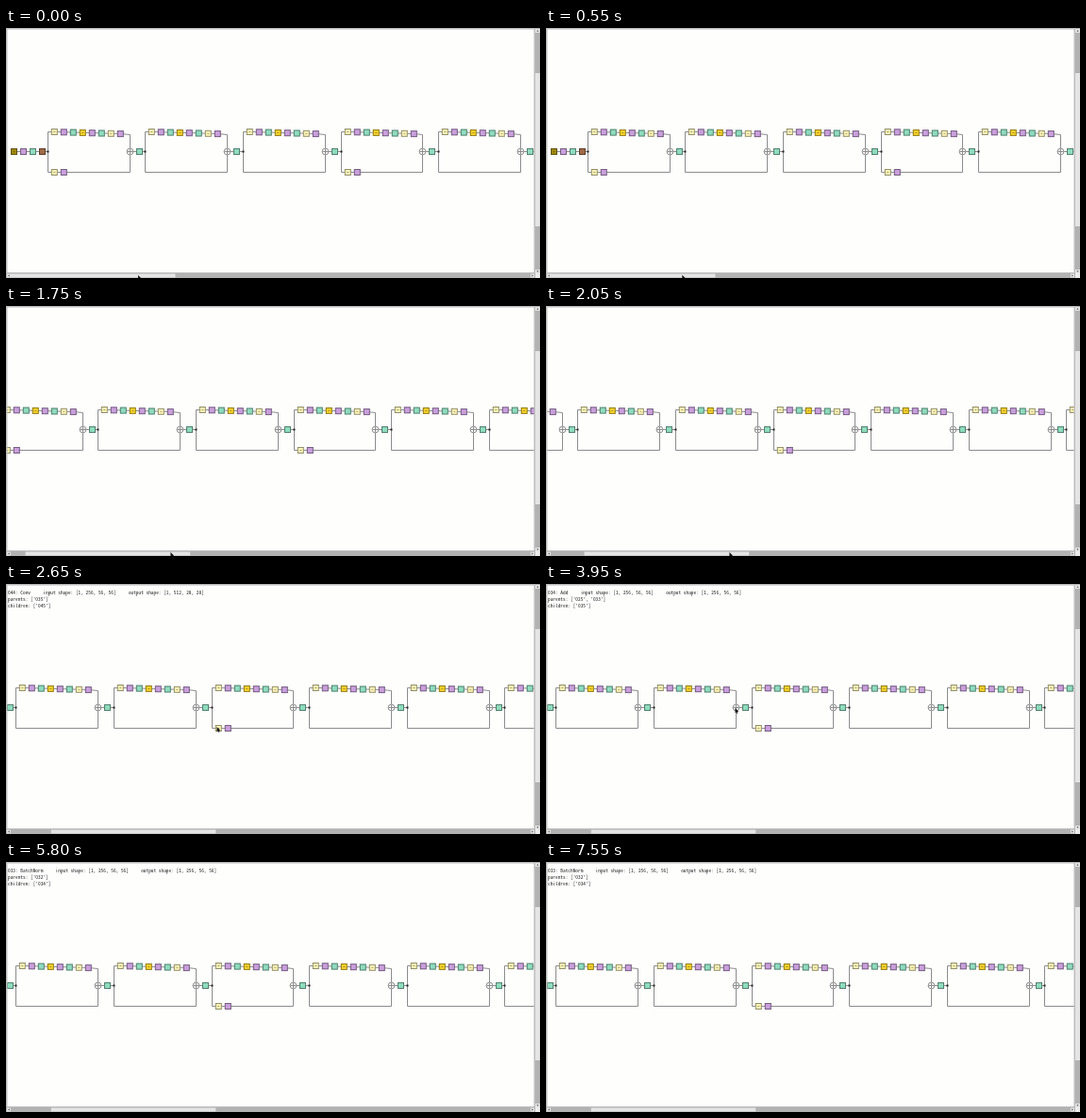
An HTML page with a canvas that plays this animation: 566x266 px, repeating every 7650 ms.

```html
<!DOCTYPE html>
<html lang="en">
<head>
<meta charset="utf-8">
<title>Network graph viewer</title>
<style>
  html, body { margin: 0; width: 100%; height: 100%; overflow: hidden; background: #fefefd; }
  canvas { display: block; width: 566px; height: 266px; }
</style>
</head>
<body>
<canvas id="stage" width="566" height="266"></canvas>
<script>
const ctx = document.getElementById('stage').getContext('2d');
const LOOP = 7650, STEP = 50;
const COLORS = {
  conv7: '#a08a0a', conv3: '#f6d32c', conv1: '#fbf4b8',
  norm: '#c9a0dc', relu: '#8fdcbf', pool: '#a06c48'
};
const MAIN = ['conv1', 'norm', 'relu', 'conv3', 'norm', 'relu', 'conv1', 'norm'];
const STEM = ['conv7', 'norm', 'relu', 'pool'];
const PAPER = '#fefefd', WIRE = '#8c8c8c', TRACK = '#b2b2b2', THUMB = '#e4e4e4';
const MID = 131.5, TOP = 110.5, BOTTOM = 153.5;
const SCROLL_RATIO = 3.2, GRAB_X = 158.8, DRAG_START = 1100, DRAG_END = 2150;

// [time, value...]
const SCROLL = [[1350, 0], [1500, 13.5], [1750, 50], [2050, 114], [DRAG_END, 137]];
const POINTER = [
  [300, 140, 263], [DRAG_START, GRAB_X, 262], [DRAG_END, 201.6, 262], [2650, 223.5, 152],
  [3050, 223.5, 152], [3450, 211.5, 133], [3700, 211.5, 133], [3950, 200.5, 132],
  [4250, 200.5, 132], [4750, 190.5, 112], [5150, 190.5, 112], [5800, 188, -8]
];

const SMALL = '[1, 256, 56, 56]';
const info = (time, id, type, output, parents, children) =>
  ({ time, lines: [
    `${id}: ${type}     input shape: ${SMALL}     output shape: ${output}`,
    `parents: [${parents}]`, `children: [${children}]`
  ] });
const INFO = [
  info(2600, '044', 'Conv', '[1, 512, 28, 28]', "'035'", "'045'"),
  info(3350, '035', 'ReLU', SMALL, "'034'", "'036', '044'"),
  info(3850, '034', 'Add', SMALL, "'025', '033'", "'035'"),
  info(4600, '033', 'BatchNorm', SMALL, "'032'", "'034'")
];

const FONT = '5.34px "Noto Sans Mono CJK SC", "Noto Sans Mono CJK JP", "Liberation Mono", monospace';

const linear = u => u;
const smooth = u => u * u * (3 - 2 * u);
const snap = v => Math.round(v) + 0.5;

function sample(keys, t, ease) {
  if (t <= keys[0][0]) return keys[0].slice(1);
  for (let i = 1; i < keys.length; i++) {
    const [a, b] = [keys[i - 1], keys[i]];
    if (t > b[0]) continue;
    const u = ease((t - a[0]) / (b[0] - a[0]));
    return b.slice(1).map((v, k) => a[k + 1] + (v - a[k + 1]) * u);
  }
  return keys[keys.length - 1].slice(1);
}

function rect(x, y, w, h, color) {
  ctx.fillStyle = color;
  ctx.fillRect(x, y, w, h);
}

function path(...points) {
  ctx.beginPath();
  points.forEach(([x, y]) => ctx.lineTo(x, y));
  ctx.strokeStyle = WIRE;
  ctx.stroke();
}

function node(type, x, y) {
  rect(x - 3.5, y - 3.5, 7, 7, COLORS[type]);
  ctx.strokeStyle = 'rgba(0, 0, 0, 0.42)';
  ctx.strokeRect(x - 3, y - 3, 6, 6);
  if (type.startsWith('conv')) rect(x - 1, y - 0.5, 2, 1, 'rgba(80, 60, 20, 0.45)');
}

function adder(x) {
  ctx.beginPath();
  ctx.arc(x, MID, 3.4, 0, Math.PI * 2);
  ctx.fillStyle = PAPER;
  ctx.fill();
  ctx.strokeStyle = WIRE;
  ctx.stroke();
  path([x - 3, MID], [x + 3, MID]);
  path([x, MID - 3], [x, MID + 3]);
}

function block(start, hasBranch) {
  const x = snap(start), add = snap(start + 86.9);
  path([x, MID], [x, TOP], [x + 10, TOP], [x + 77, TOP + 2], [add, TOP + 3],
       [add, BOTTOM], [x, BOTTOM], [x, MID]);
  path([add, MID], [snap(start + 103.57), MID]);
  MAIN.forEach((type, k) => node(type, x + 6.8 + 10 * k, TOP + 0.3 * k));
  if (hasBranch) ['conv1', 'norm'].forEach((type, k) => node(type, x + 6.8 + 10 * k, BOTTOM));
  adder(add);
  node('relu', add + 10, MID);
  rect(x - 1, MID - 1, 2, 2, '#222');
}

function network(scroll) {
  const stem = snap(7.8 - scroll);
  path([stem, MID], [stem + 36, MID]);
  STEM.forEach((type, k) => node(type, stem + 10 * k, MID));
  for (let i = 0; i < 7; i++)
    block(43.8 + 103.57 * i - scroll, i === 0 || i === 3);
}

function arrow(x, y, dx, dy) {
  ctx.beginPath();
  ctx.moveTo(x + dx * 1.3, y + dy * 1.3);
  ctx.lineTo(x - dx + dy, y - dy + dx);
  ctx.lineTo(x - dx - dy, y - dy - dx);
  ctx.fillStyle = '#777';
  ctx.fill();
}

function windowFrame(scroll) {
  ctx.strokeStyle = '#bebebe';
  ctx.lineWidth = 1.5;
  ctx.strokeRect(0.75, 0.75, 559.5, 260);
  rect(561, 0, 5, 261, TRACK);
  rect(0, 261, 561, 5, TRACK);
  rect(561, 261, 5, 5, '#ececec');
  rect(561, 1, 5, 4, THUMB);
  rect(561, 257, 5, 4, THUMB);
  rect(561, 48, 5, 163, THUMB);
  rect(1, 261.5, 4, 4, THUMB);
  rect(556, 261.5, 4, 4, THUMB);
  rect(5 + scroll / SCROLL_RATIO, 261.5, 174.5, 4, THUMB);
  arrow(563.5, 3, 0, -1);
  arrow(563.5, 259, 0, 1);
  arrow(3, 263.5, -1, 0);
  arrow(558, 263.5, 1, 0);
}

function pointer(x, y) {
  ctx.beginPath();
  [[0, 0], [0, 5.2], [1.2, 4.2], [2, 6], [2.9, 5.6], [2.1, 3.9], [3.7, 3.7]]
    .forEach(([dx, dy]) => ctx.lineTo(x + dx, y + dy));
  ctx.fillStyle = '#111';
  ctx.fill();
}

function draw(t) {
  const [scroll] = sample(SCROLL, t, linear);
  let [x, y] = sample(POINTER, t, smooth);
  if (t >= DRAG_START && t <= DRAG_END) x = GRAB_X + scroll / SCROLL_RATIO;

  ctx.lineWidth = 1;
  rect(0, 0, 566, 266, PAPER);
  network(scroll);
  windowFrame(scroll);

  const shown = INFO.filter(entry => t >= entry.time).pop();
  if (shown) {
    ctx.font = FONT;
    ctx.fillStyle = '#222';
    shown.lines.forEach((line, i) => ctx.fillText(line, 2, 10.6 + 7.2 * i));
  }
  pointer(x, y);
}

function tick() {
  const t = performance.now() % LOOP;
  draw(Math.floor(t / STEP) * STEP);
  requestAnimationFrame(tick);
}
tick();
</script>
</body>
</html>
```
